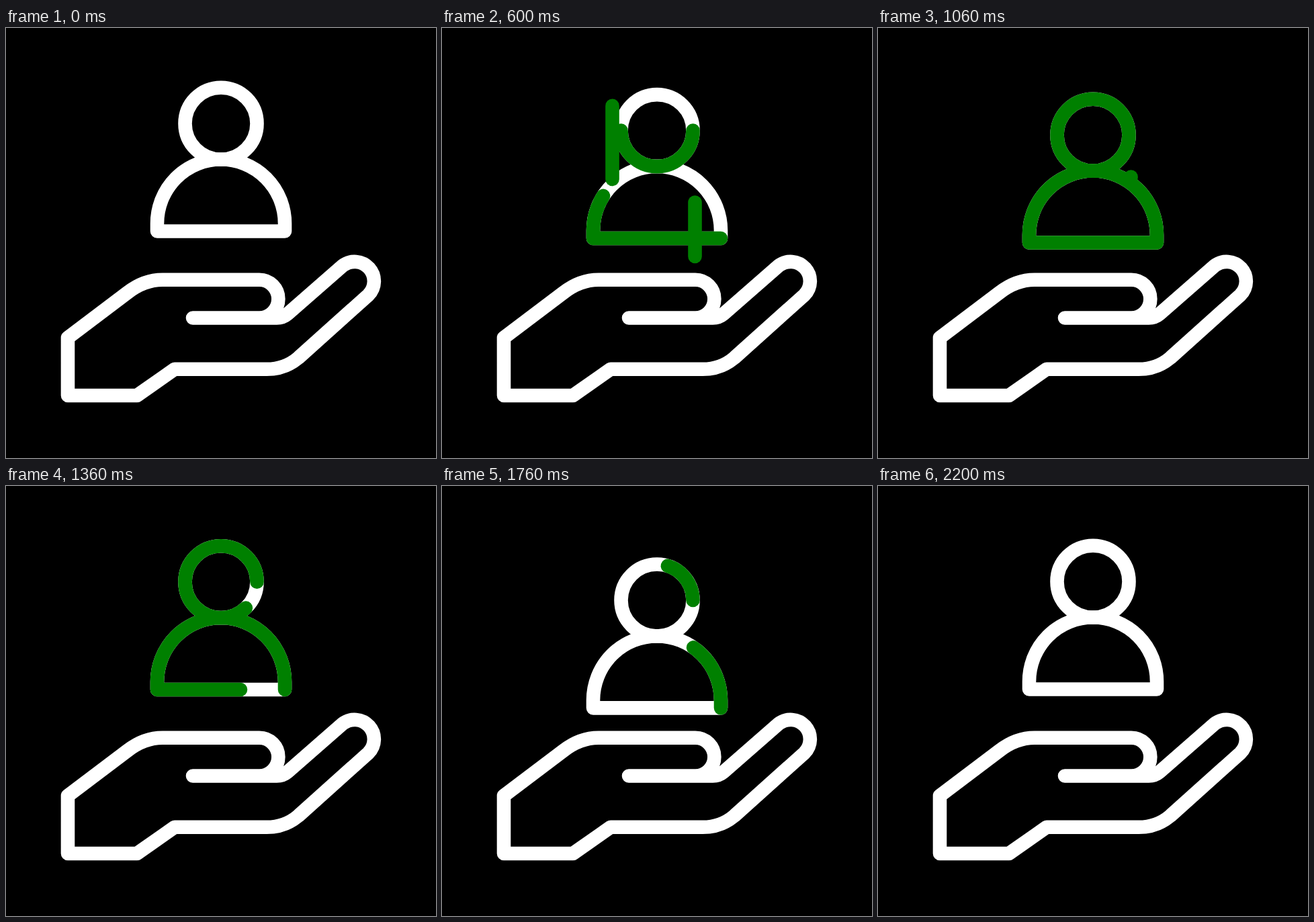
Write an HTML page that moves like this. It is 640 px wide and 640 px high and loops after 2.5 s.

```html
<!DOCTYPE html>
<html lang="en">
<head>
<meta charset="utf-8">
<title>Hand holding a person</title>
<style>
  html, body { margin: 0; width: 100%; height: 100%; overflow: hidden; background: #000; }
  svg { display: block; width: 100vw; height: 100vh; }
  path, circle {
    fill: none; stroke: #fff; stroke-width: 20.6;
    stroke-linecap: round; stroke-linejoin: round;
  }
  .trim { stroke: #008000; visibility: hidden; }
</style>
</head>
<body>
<svg viewBox="0 0 640 640">
  <path d="M278 431.5H403Q412 431.5 419 425.6L500.6 354.3A29 29 0 0 1 539.4 397.3L435 491
           C422 502 405 507.8 388 507.8H251L195 547H92V461L181 393.8C196.5 381.8 214.5 374.8 233 374.8H377
           A28.3 28.3 0 0 1 377 431.5"/>
  <g id="person">
    <circle cx="320" cy="142.2" r="53.5"/>
    <path d="M415 302.5H225V291A95 95.5 0 0 1 415 291V302.5"/>
    <circle class="trim" id="head" pathLength="1" cx="320" cy="142.2" r="53.5"/>
    <path class="trim" id="body" pathLength="1" d="M415 302.5H225V291A95 95.5 0 0 1 415 291V302.5"/>
  </g>
  <path class="trim" id="leftLine" pathLength="1" d="M253.5 225V105"/>
  <path class="trim" id="rightLine" pathLength="1" d="M376.5 340V221.5"/>
</svg>
<script>
  const LOOP = 2500, LAST_STEP = 44, DROP = 29;
  const el = id => document.getElementById(id);
  const person = el('person');

  // Eased progress between two steps
  function ease(n, from, to) {
    const u = Math.min(1, Math.max(0, (n - from) / (to - from)));
    return u * u * (3 - 2 * u);
  }

  const dip = (n, start, low, end) => DROP * (ease(n, start, low) - ease(n, low, end));

  // Shows the part of a path between the fractions a and b
  function trim(id, a, b) {
    const style = el(id).style;
    style.visibility = b - a > 1e-4 ? 'visible' : 'hidden';
    style.strokeDasharray = `${b - a} 2`;
    style.strokeDashoffset = -a;
  }

  function draw(n) {
    const y = dip(n, 7.9, 18, 24.8) + dip(n, 26.2, 36.2, 43.5);
    person.setAttribute('transform', `translate(0 ${y})`);

    const a = ease(n, 23.3, 39.75), b = ease(n, 3.7, 20.3);
    trim('head', a, b);
    trim('body', a, b);

    trim('leftLine', ease(n, 12, 18.7), ease(n, 0.6, 14.6));
    trim('rightLine', ease(n, 14.7, 21.4), ease(n, 3.3, 17.3));
  }

  // Steps last 60 ms and 40 ms in turn; the last one is held
  function stepAt(t) {
    const n = 2 * Math.floor(t / 100) + (t % 100 >= 60 ? 1 : 0);
    return Math.min(n, LAST_STEP);
  }

  const begin = performance.now();
  function tick() {
    draw(stepAt((performance.now() - begin) % LOOP));
    requestAnimationFrame(tick);
  }
  tick();
</script>
</body>
</html>
```
